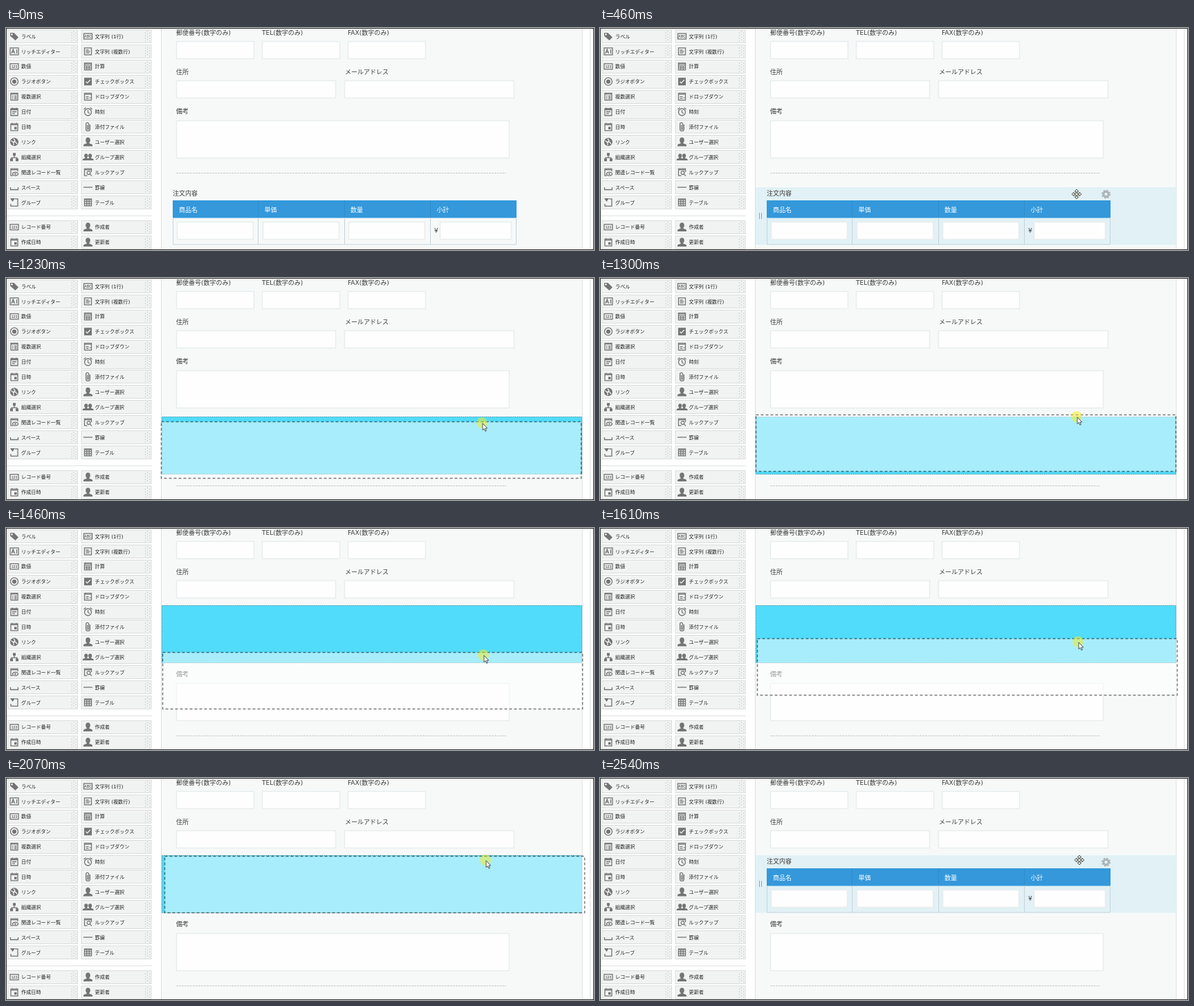
Write an HTML page that moves like this. It is 850 px wide and 322 px high and loops after 4180 ms.

```html
<!DOCTYPE html>
<html lang="ja">
<head>
<meta charset="utf-8">
<title>Form builder</title>
<style>
  html, body { margin: 0; width: 100%; height: 100%; overflow: hidden; background: #fff; }
  svg { display: block; width: 100vw; height: 100vh; }
  text { font-family: "DejaVu Sans", "Noto Sans CJK JP", "Noto Sans CJK", sans-serif; font-size: 9px; fill: #3a3a3a; }
  .side text { font-size: 7.15px; fill: #222; }
  .button { fill: #f1f3f2; stroke: #dadcdc; }
  .grip { stroke: #c2c6c6; stroke-width: 1.2; stroke-dasharray: 1.2 2.8; }
  .icon { stroke: #747474; stroke-width: 1.3; fill: none; }
  .icon .f { fill: #747474; stroke: none; }
  .icon .w { stroke: #f1f3f2; }
  .side .icon text { font: bold 5px "Liberation Sans", sans-serif; fill: #666; stroke: none; text-anchor: middle; }
  .field { fill: #fefefe; stroke: #e9eded; stroke-width: 1.6; }
  .rule { stroke: #c6caca; stroke-dasharray: 3 1; }
  .head text { fill: #fff; }
</style>
</head>
<body>
<svg viewBox="0 0 850 322" preserveAspectRatio="none">
  <rect width="850" height="322" fill="#fff"/>
  <path d="M844.5 0V322" stroke="#dfe1e1"/>
  <rect x="224.5" y="-2" width="608.5" height="330" fill="#f7f9f9" stroke="#dcdfdf"/>
  <g id="side" class="side"><path d="M1 272.5H211" stroke="#dfe1e1"/></g>
  <g id="fixed"></g>
  <g id="remarks"></g>
  <path id="rule" class="rule" d="M246 210.5H723"/>
  <g id="table">
    <g id="hover">
      <rect x="225" y="231" width="608" height="83.5" fill="#e1f1f6"/>
      <path d="M230.5 268V277M233.5 268V277" stroke="#98a5aa"/>
      <g transform="translate(731.5 241)" fill="none" stroke="#adb4b6">
        <circle r="3.7" stroke-width="3"/>
        <circle r="5.6" stroke-width="2" stroke-dasharray="2.2 2.198"/>
      </g>
    </g>
  </g>
  <rect id="slot" x="225.5" width="607" height="83" fill="#50dcfa" stroke="#4a9fb4" stroke-dasharray="2 1"/>
  <rect id="dragged" width="607" height="82" fill="#fff" fill-opacity=".5" stroke="#000" stroke-opacity=".52" stroke-width="1.5" stroke-dasharray="4 3"/>
  <g id="cursor">
    <circle id="glow" r="8" fill="#f5ee1e"/>
    <path id="arrow" d="M1 .8V10.6L3.2 8.6L4.9 12.3L6.4 11.6L4.8 8H7.8Z" fill="#fff" stroke="#444" stroke-width=".9"/>
    <g id="move" fill="#eaf4e4" stroke="#444" stroke-width=".9"></g>
  </g>
  <rect x=".5" y=".5" width="849" height="321" fill="none" stroke="#333"/>
</svg>
<script>
const $ = id => document.getElementById(id);
const add = (id, markup) => $(id).insertAdjacentHTML('beforeend', markup);
const label = (x, middle, text, size = 9) => `<text x="${x}" y="${middle + size * .37}">${text}</text>`;
const field = (x, y, w, h = 26) => `<rect class="field" x="${x + .5}" y="${y + .5}" width="${w - 1}" height="${h - 1}"/>`;

// Icons are drawn around the origin in a 12 px box.
const wide = word => `<rect x="-6" y="-4" width="12" height="8"/><text y="1.9">${word}</text>`;
const box = '<rect x="-5" y="-5" width="10" height="10"/>';
const calendar = '<path d="M-5-4.5H5V5.5H-5ZM-5-3H5M-3-6V-4M3-6V-4"/>';
const person = x => `<g transform="translate(${x})" class="f"><ellipse cy="-2.6" rx="3.3" ry="3.9"/><path d="M-6.5 6.2V4.6Q-6.5 3.4-1.8 2V0H1.8V2Q6.5 3.4 6.5 4.6V6.2Z"/></g>`;
const icons = {
  tag: '<path class="f" d="M-6-5H-.5L6 1.5L1.5 6L-6-.5Z"/><circle class="w" cx="-3.5" cy="-2.7" r=".7"/>',
  rich: '<rect x="-6" y="-5" width="12" height="10"/><path d="M-4 3L-1.7-3L.6 3M-3.3 1H0M3.5-3V3"/>',
  number: wide('123'),
  radio: '<circle r="5.5"/><circle class="f" r="3"/>',
  list: box + '<path d="M-5-3.8H5M-3-1H-1.5M0-1H3.5M-3 1H-1.5M0 1H3.5M-3 3H-1.5M0 3H3.5"/>',
  date: calendar + '<path d="M-3 0H3M-3 2.7H1"/>',
  datetime: calendar + '<path class="f" d="M0 0H3.5V3.5H0Z"/>',
  globe: '<circle class="f" r="6"/><path class="w" d="M-4.5-2L-1 1.2V5M-1-5L1-2L-1 0H2L4 3"/>',
  org: '<path d="M0-2V1M-4 4V1H4V4"/><path class="f" d="M-2-6H2V-2H-2ZM-6 2H-2V6H-6ZM2 2H6V6H2Z"/>',
  related: '<path d="M-2 5H-5V-5H5V-1M-5-3.5H5"/><ellipse cx="1.5" cy="2.5" rx="4" ry="2.5"/><circle class="f" cx="1.5" cy="2.5" r="1.2"/>',
  space: '<path d="M-5.5 0V3.5H5.5V0"/>',
  group: '<path d="M1-5H5V5.5H-5V2M3-5H5"/><path class="f" d="M-6-6H1L-2.5-1Z"/>',
  text: wide('ABC'),
  lines: box + '<path d="M-3-2H1M-3 0H3M-3 2.3H2"/>',
  calc: box + '<path d="M-5-3.4H5M-5-1H5M-5 2H5M-1.7-1V5M1.7-1V5"/>',
  check: '<rect class="f" x="-5.5" y="-5.5" width="11" height="11"/><path class="w" d="M-3 0L-1 2.2L3.3-2.5"/>',
  drop: box + '<path d="M-5-3.5H5M-3 0H1M-3 2.6H1"/><path class="f" d="M2 1H4.5L3.2 3Z"/>',
  clock: '<circle cy=".5" r="5"/><path d="M0-2.5V1L2.5 2.5M-6-3.5L-3-6M6-3.5L3-6"/>',
  clip: '<path d="M2.9-3.5V3A2.9 2.9 0 0 1-2.9 3V-4A2 2 0 0 1 1.1-4V2.5A1 1 0 0 1-.9 2.5V-3"/>',
  user: person(0),
  users: `<g transform="scale(.78)">${person(-3.5)}${person(4)}</g>`,
  lookup: '<path d="M-1 5H-5V-5H5V0M-5-3.5H5"/><circle cx="1" cy="1" r="2.4"/><path d="M2.8 2.8L5.5 5.5"/>',
  line: '<path d="M-6.5 0H6.5"/>',
  table: box + '<path d="M-5-3.8H5M-5-1H5M-5 2H5M-1.7-4V5M1.7-4V5"/>'
};

const buttons = [
  ['tag', 'ラベル', 'text', '文字列 (1行)'],
  ['rich', 'リッチエディター', 'lines', '文字列 (複数行)'],
  ['number', '数値', 'calc', '計算'],
  ['radio', 'ラジオボタン', 'check', 'チェックボックス'],
  ['list', '複数選択', 'drop', 'ドロップダウン'],
  ['date', '日付', 'clock', '時刻'],
  ['datetime', '日時', 'clip', '添付ファイル'],
  ['globe', 'リンク', 'user', 'ユーザー選択'],
  ['org', '組織選択', 'users', 'グループ選択'],
  ['related', '関連レコード一覧', 'lookup', 'ルックアップ'],
  ['space', 'スペース', 'line', '罫線'],
  ['group', 'グループ', 'table', 'テーブル'],
  ['number', 'レコード番号', 'user', '作成者'],
  ['datetime', '作成日時', 'user', '更新者']
];
function button(x, y, icon, name) {
  const top = Math.round(y - 10) + .5;
  return `<rect class="button" x="${x + .5}" y="${top}" width="101" height="19"/>
    <path class="grip" d="M${x + 93} ${top + 4}v13M${x + 96} ${top + 2}v15M${x + 99} ${top + 4}v13"/>
    <g class="icon" transform="translate(${x + 10} ${y})">${icons[icon]}</g>${label(x + 20, y, name, 7.15)}`;
}
buttons.forEach(([icon, name, icon2, name2], row) => {
  const y = 12 + row * 21.9 + (row > 11 ? 14 : 0);
  add('side', button(2, y, icon, name) + button(108.5, y, icon2, name2));
});

add('fixed', label(246, 7, '郵便番号(数字のみ)') + label(370, 7, 'TEL(数字のみ)') + label(494, 7, 'FAX(数字のみ)')
  + [246, 370, 494].map(x => field(x, 19, 113)).join('')
  + label(246, 64, '住所') + field(246, 76, 231) + label(490, 64, 'メールアドレス') + field(489, 76, 246));
add('remarks', label(246, 121, '備考') + field(246, 134, 482, 55));

const columns = [['商品名', 241], ['単価', 364.5], ['数量', 489], ['小計', 613.5]];
add('table', label(241, 240, '注文内容')
  + '<rect x="241" y="250" width="497" height="25.5" fill="#3498db"/>'
  + '<path d="M241.5 275V314H737.5V275M364.5 275V314M489.5 275V314M613.5 275V314" fill="none" stroke="#c6d4da"/>'
  + '<path d="M364.5 250V275M489.5 250V275M613.5 250V275" stroke="#2f8ccb"/>'
  + '<g class="head">' + columns.map(([name, x]) => label(x + 9, 263.5, name)).join('') + '</g>'
  + field(247, 281, 111) + field(371, 281, 111) + field(495, 281, 111) + field(627, 281, 104)
  + label(619, 293.5, '¥', 8.5));

add('move', [0, 90, 180, 270].map(a => `<path transform="rotate(${a})" d="M0-7L2.8-4H1V-1.8H-1V-4H-2.8Z"/>`).join('')
  + '<path d="M0-2.4L2.4 0L0 2.4L-2.4 0Z"/>');

// Pointer steps: time, x, y and, while dragging, top of the dragged block.
const steps = [
  [380, 690, 252], [460, 689, 241], [840, 688, 237], [1070, 688, 237],
  [1150, 688, 224, 222.5], [1230, 688, 210, 208.5], [1300, 689, 201, 198.5], [1380, 689, 193, 189.5],
  [1460, 690, 184, 180.5], [1530, 690, 173, 169.5], [1610, 691, 165, 160.5], [1690, 691, 157, 152.5],
  [1760, 691, 149, 144.5], [1840, 692, 139, 134.5], [1920, 692, 130, 125.5], [1990, 693, 123, 118.5],
  [2070, 693, 119, 113.5], [2540, 693, 119]
];
const show = (id, visible) => $(id).style.display = visible ? '' : 'none';
const shift = (id, x, y) => $(id).setAttribute('transform', `translate(${x} ${y})`);

function draw(t) {
  const [, x, y, top] = steps.findLast(step => step[0] <= t) || [];
  const dragging = top !== undefined, dropped = t >= 2540;
  const moving = t < 840 || dropped;
  show('table', !dragging);
  show('hover', t >= 380);
  shift('table', 0, dropped ? -119 : 0);
  shift('rule', 0, t >= 1230 ? 91 : 0);
  shift('remarks', 0, t >= 1380 ? 91 : 0);
  show('slot', dragging);
  show('dragged', dragging);
  if (dragging) {
    $('slot').setAttribute('y', t < 1230 ? 231.5 : t < 1380 ? 201.5 : 112.5);
    $('dragged').setAttribute('x', x - 463.5);
    $('dragged').setAttribute('y', top);
  }
  show('cursor', t >= 380);
  if (x) shift('cursor', x, y);
  show('glow', t >= 1070 && !dropped);
  $('glow').setAttribute('fill-opacity', dragging ? .5 : .7);
  show('arrow', !moving);
  show('move', moving);
}

const start = performance.now();
function tick() {
  draw((performance.now() - start) % 4180);
  requestAnimationFrame(tick);
}
tick();
</script>
</body>
</html>
```
